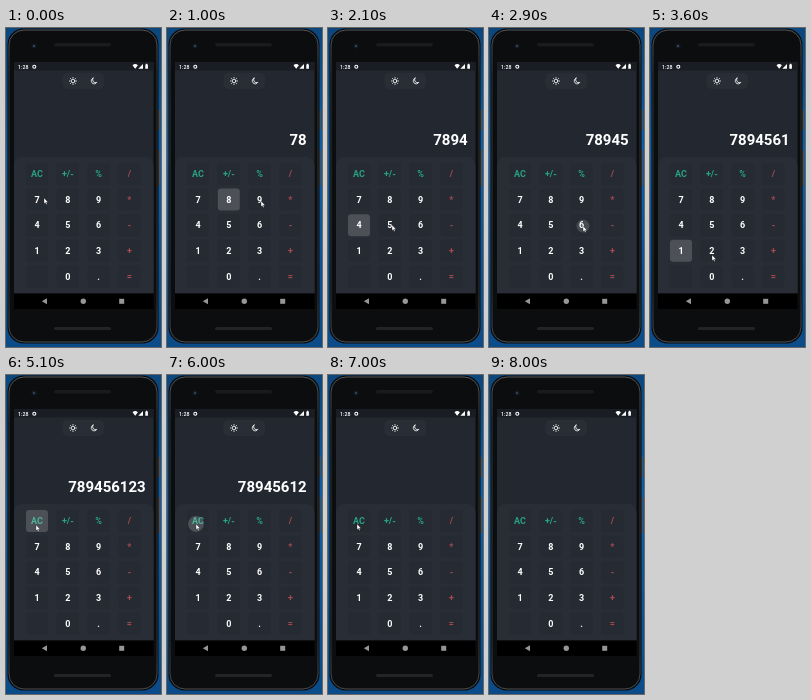
Animation of 155x319 px, one loop 8.1 s. Source, as an HTML page:

```html
<!DOCTYPE html>
<html lang="en">
<head>
<meta charset="utf-8">
<title>Calculator</title>
<style>
  html, body { margin: 0; width: 100%; height: 100%; overflow: hidden; background: #0a3a68; }
  svg { display: block; width: 155px; height: 319px; }
  text { font-family: Roboto, sans-serif; font-weight: 700; fill: #fff; }
  .key { font-size: 9px; text-anchor: middle; }
</style>
</head>
<body>
<svg viewBox="0 0 155 319">
  <defs>
    <linearGradient id="desk" x2="0" y2="1">
      <stop stop-color="#0c477c"/><stop offset=".4" stop-color="#0d5fa8"/><stop offset="1" stop-color="#0b4b88"/>
    </linearGradient>
    <linearGradient id="rim" x2="0" y2="1">
      <stop stop-color="#53575b"/><stop offset=".15" stop-color="#303336"/>
      <stop offset=".85" stop-color="#303336"/><stop offset="1" stop-color="#4a4d50"/>
    </linearGradient>
  </defs>
  <rect width="155" height="319" fill="url(#desk)"/>

  <!-- Phone body with side buttons -->
  <path d="M152 82h2v20h-2zM152 122h2v36h-2z" fill="#4b5054"/>
  <rect x="1.500" y=".5" width="151" height="315" rx="16" fill="#0a0b0c"/>
  <rect x="3" y="2" width="148" height="312" rx="15" fill="#0c0d0e" stroke="url(#rim)"/>
  <rect x="48" y="15" width="57" height="3.500" rx="1.700" fill="#191b1d"/>
  <rect x="48" y="299" width="57" height="3" rx="1.500" fill="#222426"/>
  <circle cx="28" cy="18" r="2.800" fill="#11161d"/>
  <circle cx="28" cy="18" r="1.200" fill="#33405c"/>

  <!-- Screen and status bar -->
  <rect x="8" y="34" width="139.500" height="231.500" fill="#232830"/>
  <rect x="8" y="34" width="139.500" height="8.500" fill="#1a1d23"/>
  <text x="12" y="40.800" font-size="5.300" style="font-weight:500">1:28</text>
  <circle cx="28.300" cy="38.700" r="1.500" fill="none" stroke="#fff" stroke-width="1.100"/>
  <path d="M126.500 37.200q2.700-2.200 5.400 0l-2.700 3.600zM137 36v4.800h-4.700zM139.300 36.500h.7v-.7h1.200v.7h.7v4.300h-2.600z" fill="#fff"/>

  <!-- Theme switch -->
  <rect x="56.500" y="45" width="41.500" height="16" rx="5" fill="#292d36"/>
  <g fill="none" stroke="#f2f2f2" stroke-width=".9" stroke-linecap="round">
    <circle cx="67" cy="53" r="1.800"/>
    <path id="rays"/>
    <path d="M87 50.100a3 3 0 1 0 3.800 4.300a3 3 0 0 1-3.800-4.300z"/>
  </g>

  <text id="display" x="139.700" y="116.500" font-size="15" text-anchor="end"></text>

  <path d="M8 265.500V138q0-9 9-9h121.500q9 0 9 9v127.500z" fill="#292d36"/>
  <g id="keys"></g>

  <!-- Navigation bar -->
  <rect x="8" y="265.500" width="139.500" height="15.500" fill="#000"/>
  <g fill="#969696">
    <path d="M41 270.300v6l-5.200-3z"/><circle cx="77.300" cy="273.300" r="2.700"/>
    <rect x="113.200" y="270.800" width="5" height="5"/>
  </g>

  <path id="cursor" d="M0 0V5.600L1.300 4.500L2.200 6.400L3.100 6L2.300 4.200H4Z" fill="#fff" stroke="#111" stroke-width=".3"/>
</svg>
<script>
const LOOP = 8100;
const GREEN = '#27a486', RED = '#a84a51', WHITE = '#fff';
const SIZE = 22;
const labels = ['AC', '+/-', '%', '/', '7', '8', '9', '*', '4', '5', '6', '-',
                '1', '2', '3', '+', '', '0', '.', '='];
const byId = id => document.getElementById(id);

function add(parent, tag, attributes, text = '') {
  const node = document.createElementNS('http://www.w3.org/2000/svg', tag);
  for (const name in attributes) node.setAttribute(name, attributes[name]);
  node.textContent = text;
  return parent.appendChild(node);
}

let rays = '';
for (let i = 0; i < 8; i++) {
  const c = Math.cos(i * Math.PI / 4), s = Math.sin(i * Math.PI / 4);
  rays += `M${67 + 3 * c} ${53 + 3 * s}L${67 + 3.5 * c} ${53 + 3.5 * s}`;
}
byId('rays').setAttribute('d', rays);

const ripples = {};
labels.forEach((label, i) => {
  const col = i % 4, row = i >> 2;
  const x = 31 + col * 30.8, y = 146 + row * 25.6;
  const box = { x: x - SIZE / 2, y: y - SIZE / 2, width: SIZE, height: SIZE, rx: 3 };
  const keys = byId('keys');
  add(keys, 'rect', { ...box, fill: '#262a32' });
  const color = col === 3 ? RED : row === 0 ? GREEN : WHITE;
  add(keys, 'text', { class: 'key', x, y: y + 3.2, style: `fill:${color}` }, label);
  add(add(keys, 'clipPath', { id: 'clip' + i }), 'rect', box);
  ripples[label] = add(keys, 'circle', { fill: '#fff', 'clip-path': `url(#clip${i})` });
});

// Each press: time the finger goes down, key
const presses = [[200, '7'], [700, '8'], [1200, '9'], [1780, '4'], [2380, '5'], [2850, '6'],
                 [3280, '1'], [3650, '2'], [4000, '3'], [4940, 'AC'], [5930, 'AC']];
// Cursor stops: arrival, departure, x, y
const stops = [[0, 300, 38, 170], [600, 750, 63, 173], [1000, 1300, 94, 173],
               [1600, 1900, 33, 196], [2100, 2500, 64, 197], [2700, 2950, 94, 198],
               [3200, 3450, 32, 223], [3600, 3750, 62, 227], [3900, 4150, 93, 226],
               [4300, 4300, 68, 179], [4800, 5500, 30, 150], [5600, 7700, 29, 149],
               [7800, 7800, 21, 147], [7950, LOOP, 8, 145]];

function cursorAt(t) {
  const next = stops.findIndex(stop => stop[0] > t);
  const [, leave, x, y] = stops[next < 0 ? stops.length - 1 : next - 1];
  if (next < 0 || t <= leave) return [x, y];
  const [arrive, , nx, ny] = stops[next];
  const p = (t - leave) / (arrive - leave);
  return [x + (nx - x) * p, y + (ny - y) * p];
}

function displayAt(t) {
  if (t >= 6200) return '';
  const digits = presses.filter(([down, key]) => key !== 'AC' && t >= down + 200)
    .map(press => press[1]).join('');
  return t >= 5200 ? digits.slice(0, -1) : digits;
}

function draw(t) {
  byId('display').textContent = displayAt(t);
  for (const key in ripples) ripples[key].setAttribute('opacity', 0);
  for (const [down, key] of presses) {
    const age = t - down;
    if (age < 0 || age > 500) continue;
    const [x, y] = cursorAt(down);
    const ripple = ripples[key];
    ripple.setAttribute('cx', x);
    ripple.setAttribute('cy', y);
    ripple.setAttribute('r', 3 + 28 * Math.min(1, age / 400 + Math.max(0, age - 70) / 200));
    ripple.setAttribute('opacity', 0.18 * Math.min(1, age / 60, (500 - age) / 160));
  }
  const [x, y] = cursorAt(t);
  const cursor = byId('cursor');
  cursor.setAttribute('transform', `translate(${x} ${y})`);
  cursor.setAttribute('visibility', t < 7980 ? 'visible' : 'hidden');
}

let start;
function tick(now) {
  start ??= now;
  draw((now - start) % LOOP);
  requestAnimationFrame(tick);
}
draw(0);
requestAnimationFrame(tick);
</script>
</body>
</html>
```
